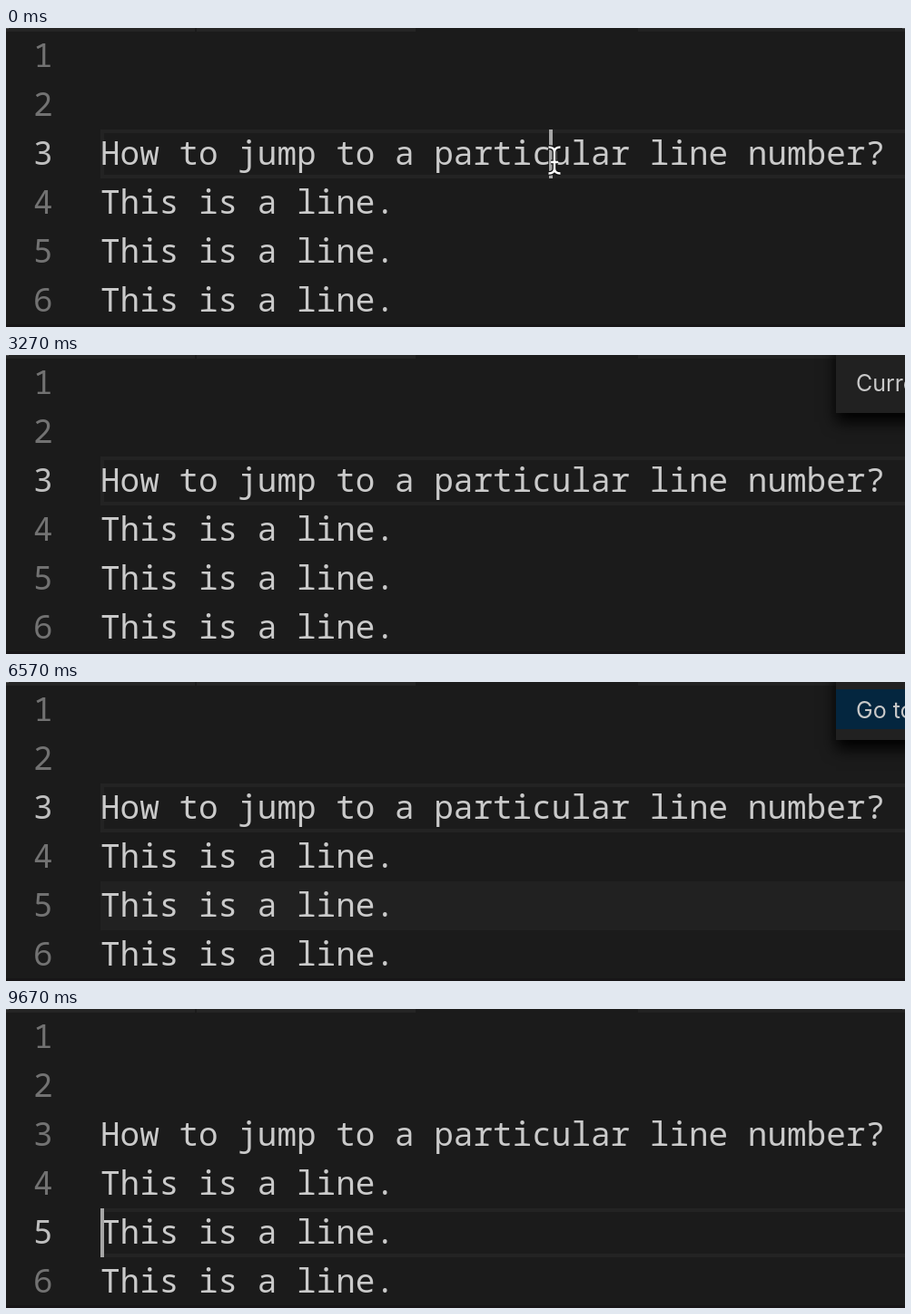
These frames come from a looping animation (990 px wide and 330 px high, 9.83 s). An HTML page with a canvas:

```html
<!DOCTYPE html>
<html lang="en">
<head>
<meta charset="utf-8">
<title>Jump to a line</title>
<style>
  html, body { margin: 0; width: 100%; height: 100%; overflow: hidden; background: #1b1b1b; }
  canvas { display: block; width: 990px; height: 330px; }
</style>
</head>
<body>
<canvas id="stage" width="990" height="330"></canvas>
<script>
const ctx = document.getElementById('stage').getContext('2d');
const LOOP = 9830;
const LINE_HEIGHT = 54;
const JUMP = 6665;
const MONO = '36px "Noto Sans Mono", monospace';
const SANS = 'Inter, "Liberation Sans", sans-serif';
const LINES = ['', '', 'How to jump to a particular line number?',
  'This is a line.', 'This is a line.', 'This is a line.'];

const KEYS = [
  { from: 1298, fade: 2200, gone: 2400, width: 131, draw: drawControlG },
  { from: 3728, fade: 4640, gone: 4835, width: 77, draw: () => keyText('5', 136) },
  { from: JUMP, fade: 7540, gone: 7735, width: 99, draw: drawReturn }
];

const lineTop = n => 4 + (n - 1) * LINE_HEIGHT;
const within = (t, a, b) => t >= a && t < b;
const clamp = x => Math.max(0, Math.min(1, x));

function rect(x, y, w, h, color) {
  ctx.fillStyle = color;
  ctx.fillRect(x, y, w, h);
}

function text(str, x, y, font, color) {
  ctx.font = font;
  ctx.fillStyle = color;
  ctx.fillText(str, x, y);
}

function shadow(color, blur, dy) {
  ctx.shadowColor = color;
  ctx.shadowBlur = blur;
  ctx.shadowOffsetY = dy;
}

function drawTabs() {
  rect(0, 0, 451, 4, '#252525');
  rect(208, 0, 2, 4, '#1b1b1b');
  rect(696, 0, 294, 4, '#222222');
  rect(0, 0, 3, 1, '#4a4a4a');
  rect(987, 0, 3, 1, '#4a4a4a');
  rect(0, 327, 990, 3, '#171517');
}

function drawEditor(t) {
  const active = t < JUMP ? 3 : 5;
  if (within(t, 3728, JUMP)) rect(104, lineTop(5), 886, LINE_HEIGHT, '#212121');
  ctx.strokeStyle = '#232323';
  ctx.lineWidth = 4;
  ctx.strokeRect(106, lineTop(active) + 2, 900, LINE_HEIGHT - 4);

  LINES.forEach((line, i) => {
    const y = 43 + i * LINE_HEIGHT;
    text(i + 1, 30, y, MONO, i + 1 === active ? '#bebebe' : '#727272');
    text(line, 104, y, MONO, '#cacaca');
  });
}

// The caret blinks every 500 ms, and hides while the prompt has focus.
function drawCaret(t) {
  if (t < 98 || within(t, 598, 1098)) rect(598, lineTop(3), 4, LINE_HEIGHT, '#a6a6a6');
  if (t >= JUMP && Math.floor((t - JUMP) / 500) % 2 === 0) {
    rect(104, lineTop(5), 4, LINE_HEIGHT, '#a6a6a6');
  }
}

function drawPrompt(t) {
  if (!within(t, 1298, JUMP)) return;
  ctx.save();
  shadow('#000', 16, 10);
  rect(914, -20, 120, 84, '#212121');
  ctx.restore();
  const typed = t >= 3728;
  if (typed) rect(914, 8, 76, 44, '#04263f');
  text(typed ? 'Go to line 5.' : 'Current Line: 3', 936, 40, '25px ' + SANS, '#c8c8c8');
}

function keyText(str, center) {
  ctx.textAlign = 'center';
  text(str, center, 83, '54px ' + SANS, '#a2a2a2');
  ctx.textAlign = 'left';
}

function drawControlG() {
  ctx.beginPath();
  ctx.moveTo(126, 66);
  ctx.lineTo(144, 47);
  ctx.lineTo(162, 66);
  ctx.stroke();
  keyText('G', 187);
}

function drawReturn() {
  ctx.beginPath();
  ctx.moveTo(156, 41);
  ctx.lineTo(157.5, 41);
  ctx.arc(157.5, 51.5, 10.5, -Math.PI / 2, Math.PI / 2);
  ctx.lineTo(136, 62);
  ctx.stroke();
  ctx.beginPath();
  ctx.moveTo(125.5, 62);
  ctx.lineTo(137, 50.5);
  ctx.lineTo(137, 73.5);
  ctx.fill();
}

function drawKey(t) {
  const key = KEYS.find(k => within(t, k.from, k.gone));
  if (!key) return;
  ctx.save();
  ctx.globalAlpha = 1 - clamp((t - key.fade) / (key.gone - key.fade));
  ctx.fillStyle = '#393939';
  ctx.beginPath();
  ctx.roundRect(98, 16, key.width, 90, 30);
  ctx.fill();
  shadow('rgba(0,0,0,.65)', 4, 2);
  ctx.fillStyle = ctx.strokeStyle = '#a2a2a2';
  ctx.lineWidth = 4.5;
  key.draw();
  ctx.restore();
}

// Typing hides the pointer; near the end it returns and flicks off to the right.
function pointerPosition(t) {
  if (t < 1265) return [604, 146];
  if (!within(t, 8528, 8695)) return null;
  const p = Math.pow(clamp((t - 8535) / 140), 1.5);
  return [612 + 355 * p, 140.5 - 70 * p];
}

function drawPointer(t) {
  const position = pointerPosition(t);
  if (!position) return;
  ctx.save();
  ctx.translate(...position);
  ctx.beginPath();
  for (const side of [-1, 1]) {
    ctx.moveTo(side * 6.5, -14.5);
    ctx.quadraticCurveTo(0, -14.5, 0, -9);
    ctx.lineTo(0, 9);
    ctx.quadraticCurveTo(0, 14.5, side * 6.5, 14.5);
  }
  ctx.moveTo(-4, 2);
  ctx.lineTo(4, 2);
  ctx.strokeStyle = '#111';
  ctx.lineWidth = 5;
  ctx.stroke();
  ctx.strokeStyle = '#fff';
  ctx.lineWidth = 2.4;
  ctx.stroke();
  ctx.restore();
}

function frame(now) {
  // The screen advances 30 times a second.
  const t = Math.floor(((now % LOOP) + 4) * 0.03) / 0.03;
  rect(0, 0, 990, 330, '#1b1b1b');
  drawTabs();
  drawEditor(t);
  drawCaret(t);
  drawPrompt(t);
  drawKey(t);
  drawPointer(t);
  requestAnimationFrame(frame);
}

requestAnimationFrame(frame);
</script>
</body>
</html>
```
